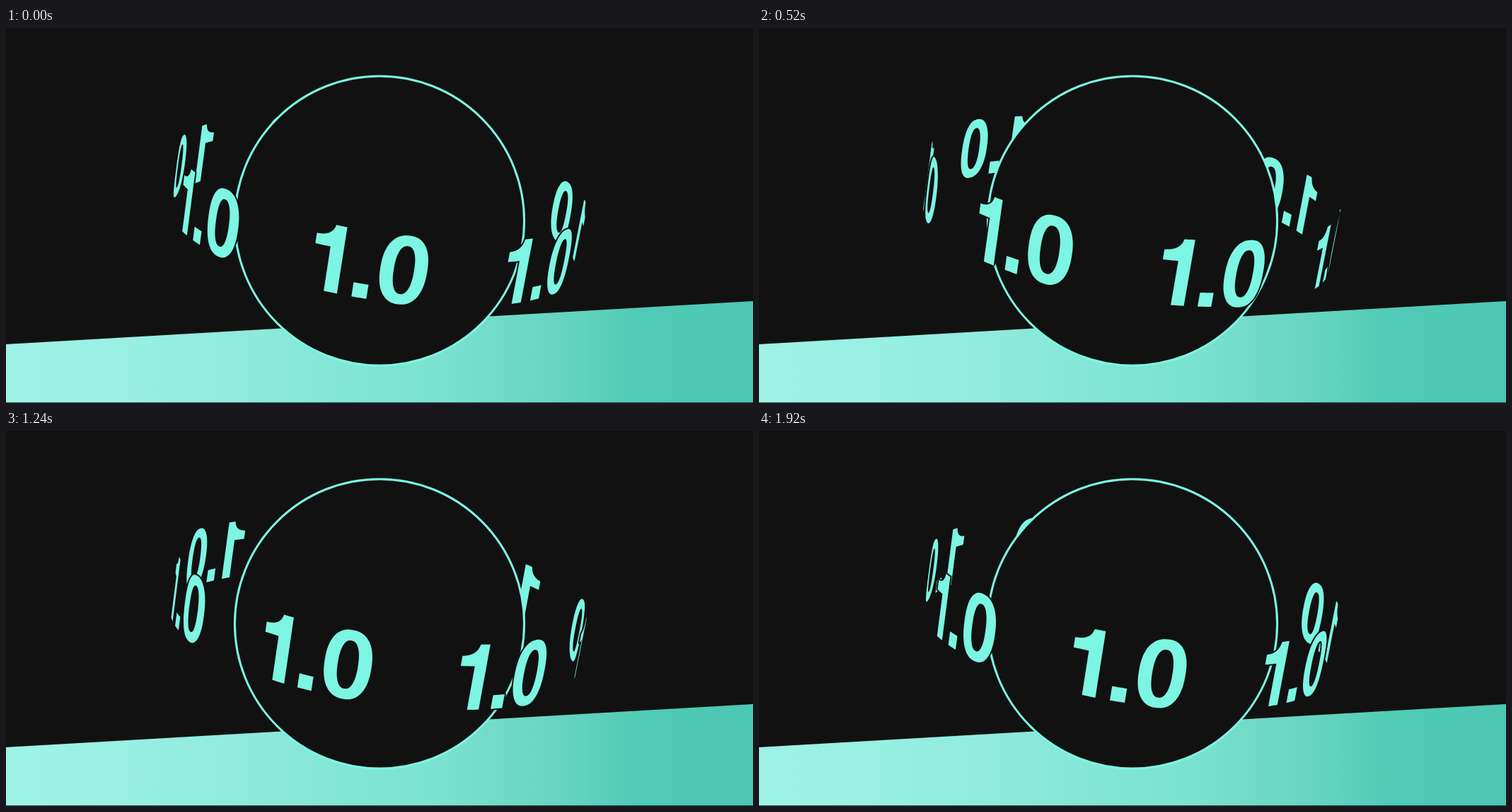
Write an HTML page with a canvas that moves like this. It is 1056 by 530 pixels and loops after 1960 ms.

```html
<!DOCTYPE html>
<html lang="en">
<head>
<meta charset="utf-8">
<title>Spinning ring</title>
<style>
  html, body { margin: 0; width: 100%; height: 100%; overflow: hidden; background: #111; }
  canvas { display: block; width: 1056px; height: 530px; }
</style>
</head>
<body>
<canvas id="stage" width="1056" height="530"></canvas>
<script>
const ctx = document.getElementById('stage').getContext('2d');
const DARK = '#111111', MINT = '#7cf5e2';
const LOOP = 1960, STEP = 40;

// Ring geometry: radius, camera distance, pitch, roll and screen centre
const R = 289.5, D = 2420, CX = 527.2, CY = 246.5;
const PITCH = 16 * Math.PI / 180, ROLL = 9.2 * Math.PI / 180;
const SP = Math.sin(PITCH), CP = Math.cos(PITCH);
const SR = Math.sin(ROLL), CR = Math.cos(ROLL);
const COUNT = 7, GAP = 2 * Math.PI / COUNT;
const START = -0.1172, TURN = 0.0369;
const EDGE = Math.acos(R / (D * CP)); // angle where the surface turns away
const MID = 36 / R;                   // middle of the label
const CAP = 44.25;                    // half the digit height

function project(a, h) {
  const c = R * Math.cos(a);
  const s = D / (D - c * CP + h * SP);
  const u = R * Math.sin(a) * s;
  const v = (c * SP + h * CP) * s;
  return [CX + u * CR - v * SR, CY + u * SR + v * CR];
}

// Outlines are lists of [arc position, height] points
function polygon(corners, n = 8) {
  return corners.flatMap(([x, y], i) => {
    const [x2, y2] = corners[(i + 1) % corners.length];
    return Array.from({ length: n }, (_, k) => [x + (x2 - x) * k / n, y + (y2 - y) * k / n]);
  });
}

function oval(cx, rx, ry, power) {
  const bend = v => Math.sign(v) * Math.abs(v) ** (2 / power);
  return Array.from({ length: 72 }, (_, i) => {
    const a = i / 72 * 2 * Math.PI;
    return [cx + rx * bend(Math.cos(a)), ry * bend(Math.sin(a))];
  });
}

function quad(p, q, r, n = 8) {
  return Array.from({ length: n + 1 }, (_, i) => {
    const t = i / n, m = 1 - t;
    return [0, 1].map(k => m * m * p[k] + 2 * m * t * q[k] + t * t * r[k]);
  });
}

const one = polygon([
  [0, CAP], [0, -CAP],
  ...quad([-14, -CAP], [-17, -29], [-37.3, -28.6]),
  [-37.3, -15], [-17.3, -15], [-17.3, CAP]
], 5);
const dot = polygon([[18.6, CAP], [37.6, CAP], [37.6, CAP - 19], [18.6, CAP - 19]]);
const zero = [oval(78.6, 29.9, 45.8, 2.35), oval(78.6, 12.9, 32, 2.35)];
const glyphs = [[one], [dot], zero];

function drawGlyph(outlines, base, origin, limit) {
  const fill = new Path2D(), rim = new Path2D();
  let seen = false;
  for (const outline of outlines) {
    let lastCut = true;
    const pts = outline.map(([x, h]) => {
      const a = base + x / R;
      const cut = Math.abs(a) > limit;
      if (!cut) seen = true;
      const held = Math.max(-limit, Math.min(limit, a));
      return { p: project(held + origin, h), cut };
    });
    pts.forEach(({ p }, i) => i ? fill.lineTo(...p) : fill.moveTo(...p));
    fill.closePath();
    for (const { p, cut } of [...pts, pts[0]]) {
      if (cut && lastCut || rim.started !== outline) rim.moveTo(...p);
      else rim.lineTo(...p);
      rim.started = outline;
      lastCut = cut;
    }
  }
  if (!seen) return;
  ctx.lineWidth = 4;
  ctx.lineJoin = 'round';
  ctx.strokeStyle = DARK;
  ctx.stroke(rim);
  ctx.fillStyle = MINT;
  ctx.fill(fill, 'evenodd');
}

// origin 0 draws the near side, PI the far side
function drawSide(spin, origin, limit) {
  for (let i = 0; i < COUNT; i++) {
    const a = spin + i * GAP + MID - origin;
    const base = Math.atan2(Math.sin(a), Math.cos(a)) - MID;
    for (const g of glyphs) drawGlyph(g, base, origin, limit);
  }
}

const floor = ctx.createLinearGradient(0, 0, 1056, 0);
[[0, '#9ef3e6'], [0.14, '#99f0e3'], [0.3, '#90ebdd'], [0.45, '#83e6d5'], [0.58, '#7be2d0'],
 [0.67, '#70dac7'], [0.76, '#63d3bf'], [0.85, '#50cbb5'], [1, '#4dc7b2']]
  .forEach(([at, color]) => floor.addColorStop(at, color));

function drawFloor() {
  ctx.fillStyle = floor;
  ctx.beginPath();
  ctx.moveTo(0, 447);
  ctx.lineTo(1056, 386);
  ctx.lineTo(1056, 529.3);
  ctx.lineTo(0, 529.3);
  ctx.fill();
}

function drawBall() {
  ctx.beginPath();
  ctx.arc(528, 272.5, 204.6, 0, 2 * Math.PI);
  ctx.fillStyle = DARK;
  ctx.fill();
  ctx.lineWidth = 3;
  ctx.strokeStyle = MINT;
  ctx.stroke();
}

function render(now) {
  const spin = START - Math.floor(now % LOOP / STEP) * TURN;
  ctx.fillStyle = DARK;
  ctx.fillRect(0, 0, 1056, 530);
  drawFloor();
  drawSide(spin, Math.PI, Math.PI - EDGE);
  drawBall();
  drawSide(spin, 0, EDGE);
}

let begin;
function tick(now) {
  begin ??= now;
  render(now - begin);
  requestAnimationFrame(tick);
}
render(0);
requestAnimationFrame(tick);
</script>
</body>
</html>
```
